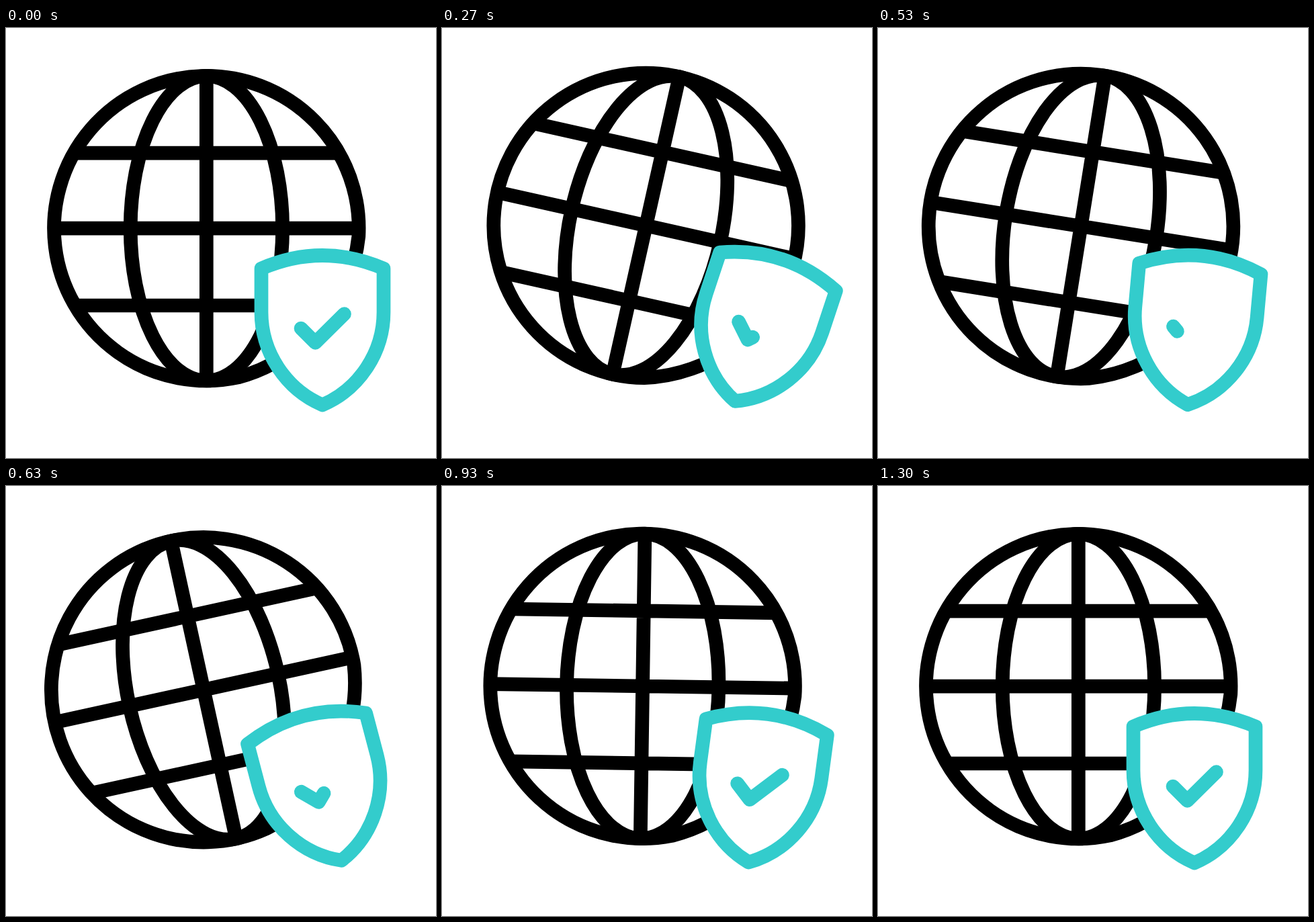
An HTML page for the animation above (1.67 s loop, 640 px wide and 640 px high).

```html
<!DOCTYPE html>
<html lang="en">
<head>
<meta charset="utf-8">
<title>Secure globe</title>
<style>
  html, body { margin: 0; height: 100%; overflow: hidden; background: #fff; }
  svg { display: block; width: 100%; height: 100%; }
  path, ellipse { fill: none; stroke-width: 20.7; }
  #globe { stroke: #000; }
  #shield { stroke: #3cc; stroke-linecap: round; stroke-linejoin: round; }
  #shield .body { fill: #fff; }
</style>
</head>
<body>
<svg viewBox="0 0 640 640">
  <g id="globe">
    <path d="M345.5 520A226.8 226.8 0 1 1 524.8 310.1A244 244 0 0 1 345.5 520Z"/>
    <ellipse cx="298.4" cy="298.2" rx="113.2" ry="226.8"/>
    <path d="M298.3 71V525M71 298.2H525M101 186.2H496M103 413H494"/>
  </g>
  <g id="shield">
    <path class="body" d="M380 358Q471 319 562 358V423C562 483 525 538 471 561C417 538 380 483 380 423Z"/>
    <path id="tick" pathLength="100" d="M439 447L460.3 468.3L503.5 425.7"/>
  </g>
</svg>
<script>
const LOOP = 1670, STEP = 33.4, REST = 39;
const globe = document.getElementById('globe');
const shield = document.getElementById('shield');
const tick = document.getElementById('tick');

function ease(p) {
  p = Math.min(1, Math.max(0, p));
  return p * p * (3 - 2 * p);
}

// Winds up to the peak, then swings back and forth, each time smaller and slower, until REST.
function swing(step, { start, top, peak, span, slowing, decay }) {
  let from = start, to = top, a = 0, b = peak;
  while (step > to && to < REST) {
    [from, to, a, b] = [to, to + span, b, -b * decay];
    span *= slowing;
    if (to + span / 2 > REST) [to, b] = [REST, 0];
  }
  return a + (b - a) * ease((step - from) / (to - from));
}

const globeSwing = { start: 3.4, top: 13.6, peak: 29.6, span: 4.9, slowing: 1.17, decay: 0.43 };
const shieldSwing = { start: 0, top: 13, peak: 27.4, span: 5.8, slowing: 1.3, decay: 0.54 };

function draw() {
  const step = Math.floor((performance.now() % LOOP + 5) / STEP);
  // The tick is gone around step 13.25 and whole ten steps to either side.
  const length = 100 * ease((Math.abs(step - 13.25) - 0.75) / 10);
  globe.setAttribute('transform', `rotate(${swing(step, globeSwing)} 320 320)`);
  shield.setAttribute('transform', `rotate(${swing(step, shieldSwing)} 471 450)`);
  tick.setAttribute('stroke-dasharray', length < 100 ? `${length} 200` : 'none');
  tick.setAttribute('visibility', length > 0 ? 'visible' : 'hidden');
  requestAnimationFrame(draw);
}
draw();
</script>
</body>
</html>
```
